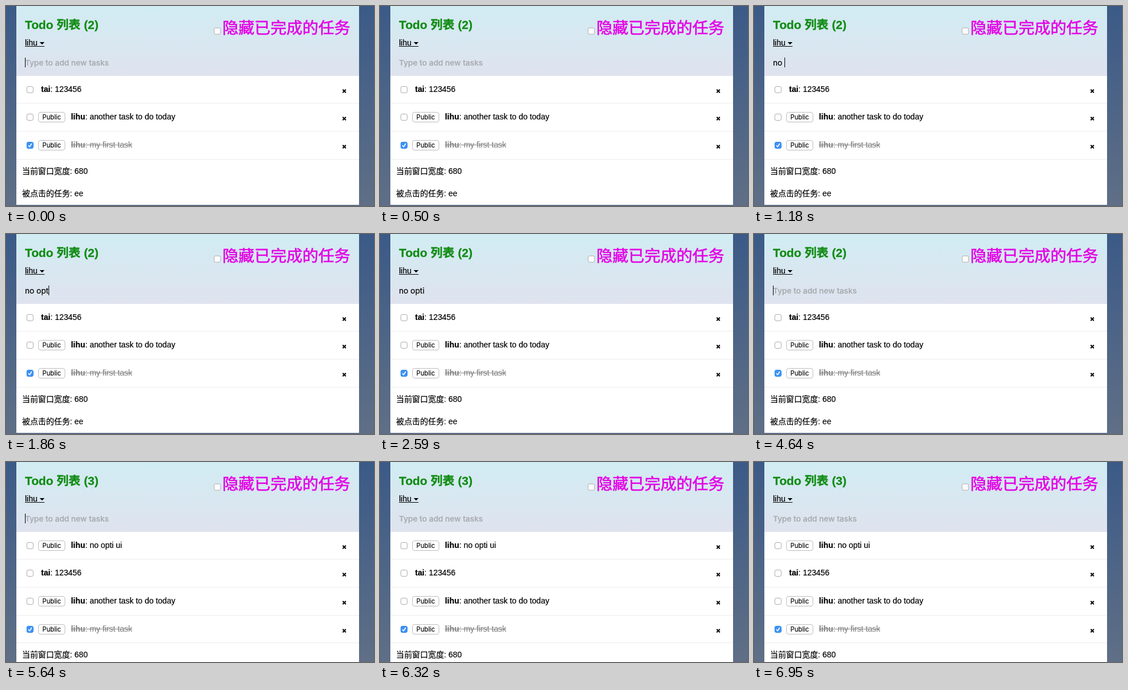
Write an HTML page with a canvas that moves like this. It is 640 px wide and 349 px high and loops after 6.99 s.

```html
<!DOCTYPE html>
<html lang="zh-CN">
<head>
<meta charset="utf-8">
<title>Todo</title>
<style>
  html, body { margin: 0; width: 100%; height: 100%; overflow: hidden; background: #45618a; }
  canvas { display: block; width: 640px; height: 349px; }
</style>
</head>
<body>
<canvas id="stage" width="640" height="349"></canvas>
<script>
const W = 640, H = 349, LOOP = 6990;
const LEFT = 18, CARD = 596;
const SANS = '"Liberation Sans", "Noto Sans CJK SC", "Noto Sans CJK", sans-serif';
const UI = 'Inter, Roboto, sans-serif';
const BODY = '13.9px ' + SANS;
const ctx = document.getElementById('stage').getContext('2d');

const ENTRY = 'no opti ui';
const keyTimes = [700, 850, 1020, 1400, 1560, 1760, 1960, 2680, 2850, 3010];
const SUBMIT = 3340, ADDED = 5380, BLINK = 500;

const baseTasks = [
  { user: 'tai', text: '123456' },
  { user: 'lihu', text: 'another task to do today', own: true },
  { user: 'lihu', text: 'my first task', own: true, done: true }
];
const allTasks = [{ user: 'lihu', text: ENTRY, own: true }, ...baseTasks];

const rowTop = i => Math.floor(121 + 48.7 * i);

// A thin outline gives the text its slightly heavier weight
function text(str, x, y, font, color = '#000', outline = 0.2) {
  ctx.font = font;
  ctx.fillStyle = ctx.strokeStyle = color;
  ctx.lineWidth = outline;
  ctx.lineJoin = 'round';
  ctx.fillText(str, x, y);
  ctx.strokeText(str, x, y);
  return x + ctx.measureText(str).width;
}

function rect(x, y, w, h, color) {
  ctx.fillStyle = color;
  ctx.fillRect(x, y, w, h);
}

function gradient(h, from, to) {
  const g = ctx.createLinearGradient(0, 0, 0, h);
  g.addColorStop(0, from);
  g.addColorStop(1, to);
  return g;
}

function box(x, y, w, h, r, fill, stroke) {
  ctx.beginPath();
  ctx.roundRect(x, y, w, h, r);
  ctx.fillStyle = fill;
  ctx.fill();
  ctx.strokeStyle = stroke;
  ctx.lineWidth = 1;
  ctx.stroke();
}

function line(points, width, color) {
  ctx.beginPath();
  points.forEach(([x, y]) => ctx.lineTo(x, y));
  ctx.lineWidth = width;
  ctx.strokeStyle = color;
  ctx.stroke();
}

function checkbox(x, y, on) {
  box(x - 5.5, y - 5.5, 11, 11, 2.5, on ? '#3c93f8' : '#fff', on ? '#2f83e6' : '#acacac');
  if (on) line([[x - 2.9, y + 0.3], [x - 0.8, y + 2.7], [x + 3, y - 3]], 1.6, '#fff');
}

function drawTask(task, i) {
  const top = rowTop(i), base = top + 29, mid = top + 25;
  const color = task.done ? '#868686' : '#000';
  checkbox(41.8, mid, task.done);
  if (task.own) {
    box(56.5, mid - 8.5, 46, 17, 3.5, '#fff', '#bdbdbd');
    text('Public', 63.3, mid + 4, '11.2px ' + UI, '#000', 0.1);
  }
  const start = task.own ? 113 : 61;
  const nameEnd = text(task.user, start, base, 'bold ' + BODY, color);
  const end = text(': ' + task.text, nameEnd, base, BODY, color);
  if (task.done) rect(start, base - 5, end - start, 1, color);

  const cx = 588.3, cy = top + 27.5, r = 2.7;
  line([[cx - r, cy - r], [cx + r, cy + r]], 2, '#000');
  line([[cx + r, cy - r], [cx - r, cy + r]], 2, '#000');
  rect(LEFT, rowTop(i + 1), CARD, 1, '#ededed');
}

function drawInput(t) {
  const typed = t < SUBMIT ? keyTimes.filter(k => k <= t).length : 0;
  let caret = 33;
  if (typed) caret = text(ENTRY.slice(0, typed), 33, 104, '13.6px ' + UI);
  else text('Type to add new tasks', 33, 104, '500 13.6px ' + UI, '#a7a9ad');

  // The caret restarts its blink after every key
  const last = Math.max(0, ...[...keyTimes, SUBMIT].filter(k => k <= t));
  if (Math.floor((t - last) / BLINK) % 2 === 0) rect(Math.round(caret), 90, 1, 17, '#000');
}

function drawHeader(t, count) {
  rect(LEFT, 0, CARD, 122, gradient(122, '#d1ecf3', '#dfe3ee'));
  text(`Todo 列表 (${count})`, 33, 40, 'bold 20.8px ' + SANS, '#128c14', 0.3);
  checkbox(367.5, 43.7, false);
  text('隐藏已完成的任务', 376.5, 48, '27.8px ' + SANS, '#e300e5', 0.6);

  text('lihu', 33, 69, BODY);
  rect(33, 70, 34, 1, '#000');
  ctx.beginPath();
  ctx.moveTo(58.5, 63);
  ctx.lineTo(67, 63);
  ctx.lineTo(62.75, 67.3);
  ctx.fill();
  drawInput(t);
}

function draw(t) {
  const tasks = t < ADDED ? baseTasks : allTasks;
  const foot = rowTop(tasks.length);
  rect(0, 0, W, H, gradient(H, '#3b5a87', '#5f6f86'));
  rect(LEFT, 0, CARD, foot + 80, '#fff');
  drawHeader(t, tasks.filter(task => !task.done).length);
  tasks.forEach(drawTask);
  text('当前窗口宽度: 680', 28, foot + 26, BODY);
  text('被点击的任务: ee', 28, foot + 65, BODY);
}

const began = performance.now();
function tick() {
  draw((performance.now() - began) % LOOP);
  requestAnimationFrame(tick);
}
tick();
</script>
</body>
</html>
```
